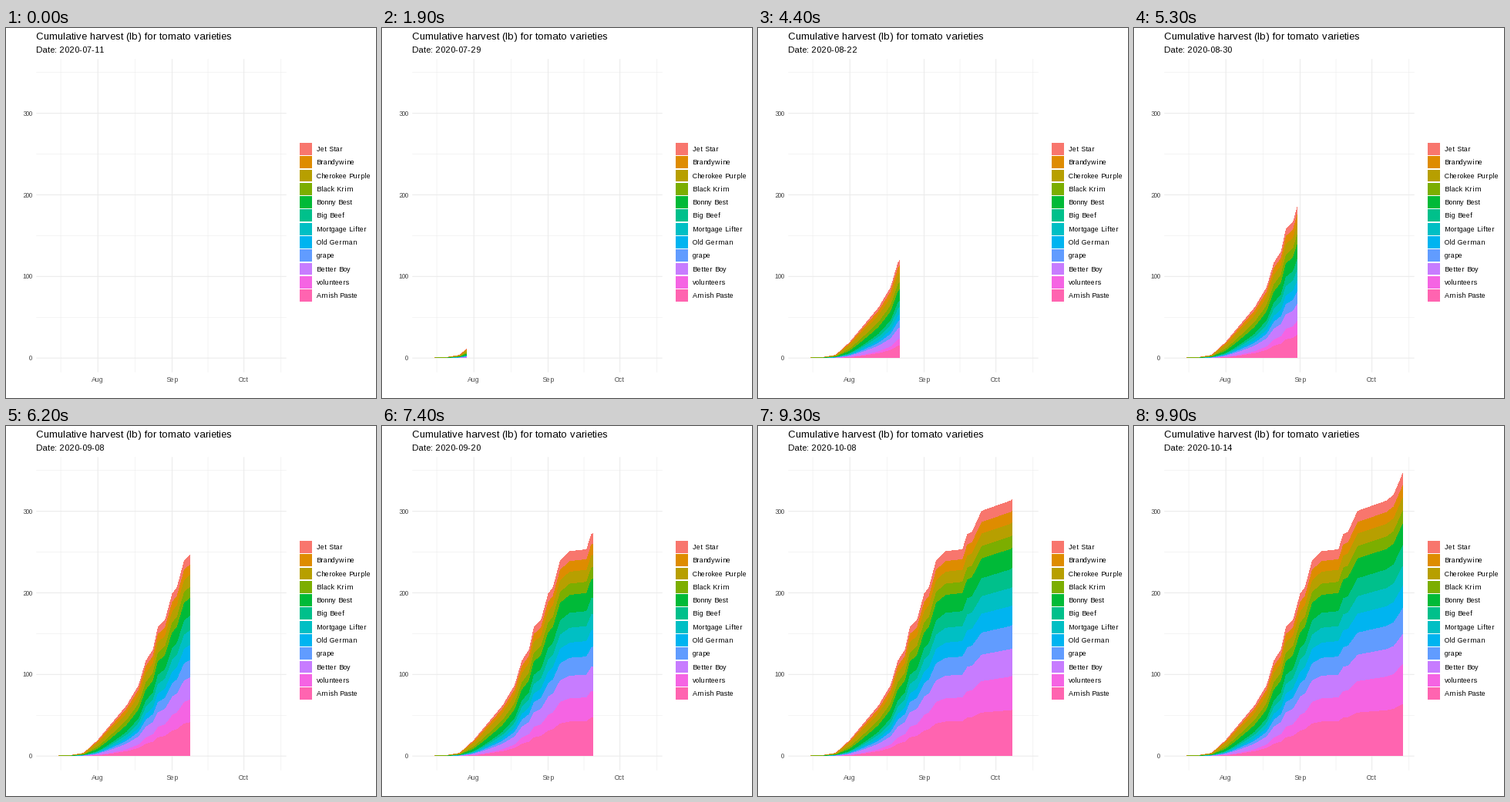
A matplotlib script for the animation above (10 s loop, 480 by 480 pixels).

```python
import numpy as np
import matplotlib.pyplot as plt
from matplotlib.animation import FuncAnimation
from matplotlib.patches import Polygon, Rectangle

plt.rcParams["font.family"] = "Liberation Sans"
plt.rcParams["text.hinting"] = "force_autohint"
plt.rcParams["text.hinting_factor"] = 1

SIZE, FRAMES, LAST_DAY = 480, 100, 95
START = np.datetime64("2020-07-11")
LEFT, RIGHT, TOP, BOTTOM = 39.27, 363.7, 40.3, 446.6
GRID, AXIS_TEXT = "#EBEBEB", "#4D4D4D"

# Name, colour, size of the final harvest, lateness (above 1 ripens late).
VARIETIES = [
    ("Jet Star", "#F8766D", 16, 0.7),
    ("Brandywine", "#DE8C00", 16, 0.5),
    ("Cherokee Purple", "#B79F00", 17, 0.3),
    ("Black Krim", "#7CAE00", 17, 0.5),
    ("Bonny Best", "#00BA38", 28, 0.6),
    ("Big Beef", "#00C08B", 27, 1.05),
    ("Mortgage Lifter", "#00BFC4", 26, 0.95),
    ("Old German", "#00B4F0", 29, 1.2),
    ("grape", "#619CFF", 34, 1.2),
    ("Better Boy", "#C77CFF", 39, 0.9),
    ("volunteers", "#F564E3", 52, 1.7),
    ("Amish Paste", "#FF64B0", 68, 1.3),
]

# Key points of the total harvest: day -> pounds.
GROWTH = {4: 0, 5: 1.2, 10: 1.4, 15: 4, 21: 20, 33: 62.3, 38: 87, 41: 117,
          44: 130.5, 46: 158, 49: 167, 52: 199, 54: 207, 57: 240, 61: 251,
          68: 253.5, 70: 272, 72: 275, 76: 300.5, 88: 313, 91: 320, 95: 348}


def px(day):
    return 54.02 + 3.105 * day


def py(lb):
    return 428.2 - 1.0587 * lb


def layer_tops(day):
    """Upper edge of each layer: its own harvest plus all those below."""
    total = np.interp(day, list(GROWTH), list(GROWTH.values()))
    ripe = np.maximum(total / GROWTH[LAST_DAY], 0.05)
    parts = np.array([size * ripe ** late for *_, size, late in VARIETIES])
    parts *= total / parts.sum(axis=0)
    return np.cumsum(parts[::-1], axis=0)[::-1]


# The chart is sampled once per pixel column, which gives hard edges.
columns = np.arange(int(px(0)), int(px(LAST_DAY)) + 1)
tops = np.round(py(layer_tops((columns + 0.5 - px(0)) / 3.105)))
base = round(py(0))

# Each day falls on a whole frame; skipped frames lie between two days.
days = np.arange(LAST_DAY + 1)
reveal_at = np.floor(days * (FRAMES - 1) / LAST_DAY + 0.51)

fig = plt.figure(figsize=(SIZE / 72, SIZE / 72), dpi=72, facecolor="white")
ax = fig.add_axes([0, 0, 1, 1])
ax.set_xlim(0, SIZE)
ax.set_ylim(SIZE, 0)
ax.axis("off")


def label(x, y, text, size=8.8, color="black", ha="left"):
    return ax.text(x, y, text, fontsize=size, color=color, ha=ha, va="baseline")


def grid_line(xs, ys, width):
    ax.plot(xs, ys, color=GRID, lw=width, solid_capstyle="butt",
            snap=False, zorder=1)


for day in (5.5, 36.5, 67, 97.5):
    grid_line([px(day)] * 2, [TOP, BOTTOM], 0.53)
for lb in (50, 150, 250, 350):
    grid_line([LEFT, RIGHT], [py(lb)] * 2, 0.53)
for day, month in ((21, "Aug"), (52, "Sep"), (82, "Oct")):
    grid_line([px(day)] * 2, [TOP, BOTTOM], 1.07)
    label(px(day), 459, month, color=AXIS_TEXT, ha="center")
for lb in (0, 100, 200, 300):
    grid_line([LEFT, RIGHT], [py(lb)] * 2, 1.07)
    label(34.3, py(lb) + 3.1, str(lb), color=AXIS_TEXT, ha="right")

label(LEFT, 15, "Cumulative harvest (lb) for tomato varieties", 13.2)
subtitle = label(LEFT, 32, "", 11)

areas = []
for k, (name, color, *_) in enumerate(VARIETIES):
    mid = 156.95 + 17.28 * k
    top, bottom = round(mid - 7.93), round(mid + 7.93)
    ax.add_patch(Rectangle((381, top), 16, bottom - top, fc=color, lw=0,
                           snap=False))
    label(403, mid + 3.15, name)
    # Each layer reaches the baseline; later layers cover its lower part.
    area = Polygon([(0, 0)] * 3, fc=color, lw=0, snap=False,
                   zorder=2 + 0.01 * k)
    areas.append(ax.add_patch(area))


def update(i):
    edge = px(np.interp(i, reveal_at, days))
    shown = columns + 0.5 <= edge
    cols = columns[shown]
    xs = np.column_stack([cols, cols + 1]).ravel()
    for area, top in zip(areas, tops):
        area.set_visible(len(cols) > 0)
        if len(cols):
            ys = np.repeat(top[shown], 2)
            area.set_xy(np.column_stack([np.r_[xs, xs[-1], xs[0]],
                                         np.r_[ys, base, base]]))
    date = START + np.timedelta64(i * LAST_DAY // (FRAMES - 1), "D")
    subtitle.set_text(f"Date: {date}")
    return [*areas, subtitle]


anim = FuncAnimation(fig, update, frames=FRAMES, interval=100, repeat=True,
                     repeat_delay=0, blit=False)
plt.show()
```
